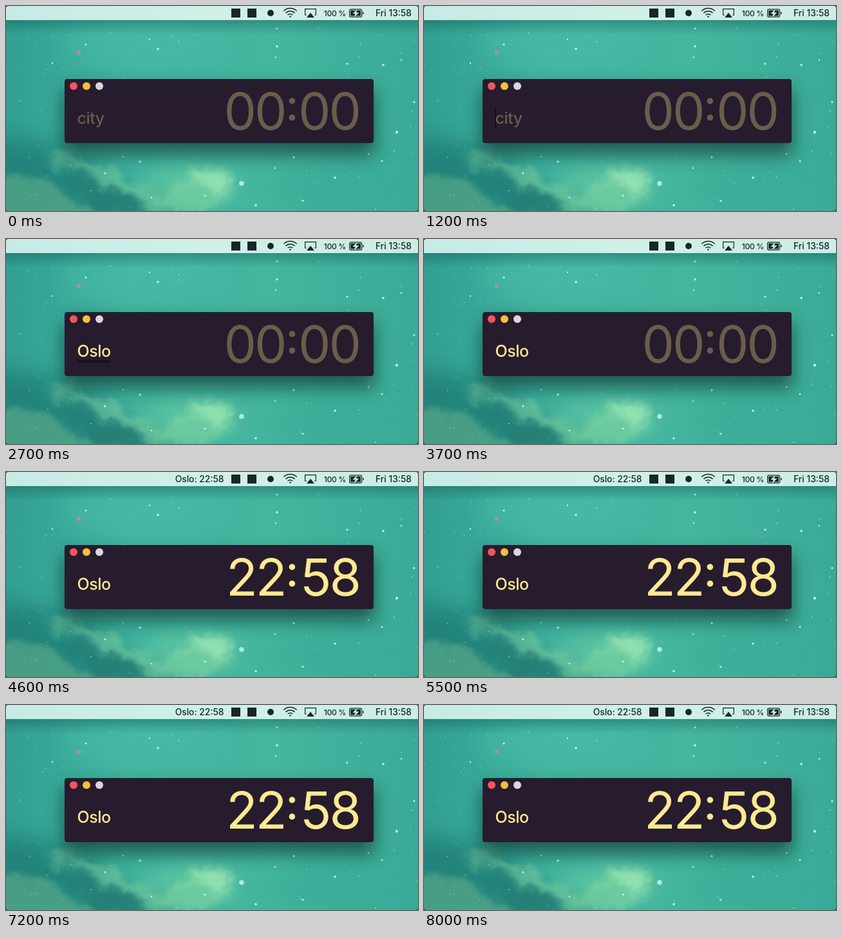
Recreate the animation shown at these times as an HTML page. Size 640 by 320 pixels, loop 8100 ms.

```html
<!DOCTYPE html>
<html lang="en">
<head>
<meta charset="utf-8">
<title>City clock</title>
<style>
  html, body { margin: 0; width: 100%; height: 100%; overflow: hidden; background: #123f40; }
  svg { display: block; width: 640px; height: 320px; }
  text { font-family: Inter, Roboto, sans-serif; white-space: pre; }
  .menu { font-size: 13.8px; font-weight: 500; fill: #172727; text-anchor: end; }
  .city { font-size: 25px; font-weight: 500; letter-spacing: -.5px; }
  .digits { font-size: 80px; letter-spacing: -3px; text-anchor: end; font-feature-settings: "calt" 0; }
  .colon { font-size: 67px; font-weight: 500; text-anchor: middle; font-feature-settings: "calt" 0; }
</style>
</head>
<body>
<svg viewBox="0 0 640 320">
  <defs>
    <linearGradient id="sky">
      <stop offset="0" stop-color="#329f91"/>
      <stop offset=".3" stop-color="#41b4a0"/>
      <stop offset=".65" stop-color="#44b59f"/>
      <stop offset="1" stop-color="#3aaa97"/>
    </linearGradient>
    <linearGradient id="bar">
      <stop offset="0" stop-color="#c6ebe4"/>
      <stop offset=".5" stop-color="#d0f0e8"/>
      <stop offset="1" stop-color="#cbede6"/>
    </linearGradient>
    <linearGradient id="under" x2="0" y2="1">
      <stop offset="0" stop-color="#0d4a48" stop-opacity=".36"/>
      <stop offset="1" stop-color="#0d4a48" stop-opacity="0"/>
    </linearGradient>
    <clipPath id="screen"><rect width="640" height="320" rx="4"/></clipPath>
    <filter id="soft" x="-50%" y="-50%" width="200%" height="200%"><feGaussianBlur stdDeviation="16"/></filter>
    <filter id="mist" x="-20%" y="-50%" width="140%" height="200%">
      <feGaussianBlur stdDeviation="7" result="cloud"/>
      <feTurbulence type="fractalNoise" baseFrequency=".025" numOctaves="4" seed="5"/>
      <feDisplacementMap in="cloud" scale="45" xChannelSelector="R" yChannelSelector="G"/>
    </filter>
    <filter id="shade" x="-20%" y="-60%" width="140%" height="240%"><feGaussianBlur stdDeviation="14"/></filter>
  </defs>

  <g clip-path="url(#screen)">
    <rect width="640" height="320" fill="url(#sky)"/>
    <g filter="url(#soft)">
      <ellipse cx="215" cy="60" rx="130" ry="40" fill="#4bbca7" opacity=".5"/>
      <path d="M-30 205Q60 200 130 245T290 340H-30Z" fill="#237f78" opacity=".85"/>
      <ellipse cx="290" cy="280" rx="75" ry="34" fill="#5fc6a0" opacity=".75"/>
      <ellipse cx="520" cy="285" rx="110" ry="40" fill="#3aac96" opacity=".6"/>
    </g>
    <g filter="url(#mist)">
      <path d="M-20 268Q40 262 85 286T170 340H-20Z" fill="#62b08a" opacity=".6"/>
      <path d="M70 232Q140 240 185 270T250 292Q300 265 345 246Q362 275 325 306T230 318Q180 290 140 268T70 248Z" fill="#78cfa2" opacity=".65"/>
      <path d="M100 268Q150 272 185 298T225 330H150Q130 290 100 268Z" fill="#257c72" opacity=".6"/>
      <path d="M270 278Q310 250 346 252Q352 280 322 300Q325 278 270 278Z" fill="#9ce8b4" opacity=".75"/>
    </g>
    <g id="stars"></g>

    <rect y="22" width="640" height="22" fill="url(#under)"/>
    <rect width="640" height="22" fill="url(#bar)"/>
    <text class="menu" id="zone" x="338.5" y="16"></text>
    <g fill="#172727">
      <rect x="350" y="4" width="14" height="14"/>
      <rect x="375" y="4" width="14" height="14"/>
      <circle cx="411" cy="11" r="5"/>
    </g>
    <g id="wifi" fill="none" stroke="#172727" stroke-width="1.4"></g>
    <path d="M467 14H464.6V4.6H481.4V14H479" fill="none" stroke="#172727" stroke-width="1.2"/>
    <path d="M473 10.5L479 18H467Z" fill="#172727"/>
    <text class="menu" x="528" y="15.5" style="font-size:12.2px;letter-spacing:-.4px">100 %</text>
    <rect x="533.6" y="5.1" width="19" height="12" rx="2.4" fill="none" stroke="#172727" stroke-width="1.2"/>
    <rect x="535.2" y="6.7" width="15.8" height="8.8" rx="1" fill="#172727"/>
    <path d="M554.2 9Q556 9.5 556 11T554.2 13.2Z" fill="#172727"/>
    <path d="M545.5 5L538.5 12H542.5L541 17.5L548.5 10.2H544Z" fill="#cdeee6"/>
    <text class="menu" x="630" y="16">Fri 13:58</text>

    <rect x="90" y="130" width="482" height="102" rx="6" fill="#0a302d" opacity=".68" filter="url(#shade)"/>
    <rect x="91" y="114" width="480" height="100" rx="4" fill="#261c2e"/>
    <circle cx="105" cy="125" r="6" fill="#f4555b"/>
    <circle cx="125" cy="125" r="6" fill="#f9bd3f"/>
    <circle cx="145" cy="125" r="6" fill="#d8d8d8"/>
    <text class="city" id="city" x="110.5" y="184"></text>
    <rect id="mark" x="110" y="189" width="53" height="4" rx="2" fill="#19111f"/>
    <rect id="caret" y="158" width="1.3" height="32" fill="#0d0812"/>
    <g id="clock">
      <text class="digits" id="hours" x="433.5" y="193"></text>
      <text class="colon" x="444.5" y="179">:</text>
      <text class="digits" id="minutes" x="549" y="193"></text>
    </g>
  </g>
</svg>
<script>
const LOOP = 8100, FOCUS = 1000, TYPE = 1600, KEY_GAP = 150, ENTER = 4100, BLINK = 500;
const WORD = 'Oslo', BRIGHT = '#ffe991', DIM = '#6b5d4b';
const TYPED = TYPE + KEY_GAP * (WORD.length - 1);
const $ = id => document.getElementById(id);

function add(parent, tag, attrs) {
  const el = document.createElementNS('http://www.w3.org/2000/svg', tag);
  for (const key in attrs) el.setAttribute(key, attrs[key]);
  parent.appendChild(el);
}

function drawStars() {
  let seed = 17;
  const random = () => (seed = seed * 16807 % 2147483647) / 2147483647;
  const star = (cx, cy, r, fill, opacity) => add($('stars'), 'circle', { cx, cy, r, fill, opacity });
  for (let i = 0; i < 130; i++) {
    star(random() * 640, 24 + random() * 294, .4 + random() * .6, '#c9f5e6', .3 + random() * .5);
  }
  const bright = [
    [72, 89], [124, 60], [236, 67], [223, 52], [421, 35], [421, 63], [419, 80],
    [530, 90], [586, 92], [614, 84], [634, 150], [447, 236], [563, 231], [584, 242],
    [511, 268], [418, 253], [461, 304], [388, 311], [182, 235], [154, 261],
    [208, 243], [226, 299], [309, 296]
  ];
  bright.forEach(([x, y], i) => star(x, y, 1.2 + i % 3 * .3, '#d8faef', .9));
  star(607, 197, 2.2, '#b5f3ee', .95);
  star(366, 277, 3.8, '#a9f2e8', .95);
  star(113, 73, 3.4, '#b48bac', .9);
}

function drawWifi() {
  for (const r of [5.5, 10, 14.5]) {
    const d = r * Math.SQRT1_2;
    add($('wifi'), 'path', { d: `M${441.5 - d} ${18 - d}A${r} ${r} 0 0 1 ${441.5 + d} ${18 - d}` });
  }
  add($('wifi'), 'circle', { cx: 441.5, cy: 16.5, r: 1.2, fill: '#172727', stroke: 'none' });
}

function show(id, on) {
  $(id).setAttribute('visibility', on ? 'visible' : 'hidden');
}

function render(t) {
  const count = t < TYPE ? 0 : Math.min(WORD.length, Math.floor((t - TYPE) / KEY_GAP) + 1);
  const city = $('city');
  city.textContent = count ? WORD.slice(0, count) : 'city';
  city.setAttribute('fill', count ? BRIGHT : DIM);

  // Each keystroke restarts the blink.
  const last = count ? TYPE + (count - 1) * KEY_GAP : FOCUS;
  const lit = Math.floor((t - last) / BLINK) % 2 === 0;
  show('caret', t >= FOCUS && t < ENTER && lit);
  $('caret').setAttribute('x', 110.5 + (count ? city.getComputedTextLength() : 0));
  show('mark', t >= TYPED + 300 && t < 3300);

  const done = t >= ENTER;
  $('hours').textContent = done ? '22' : '00';
  $('minutes').textContent = done ? '58' : '00';
  $('clock').setAttribute('fill', done ? BRIGHT : DIM);
  $('zone').textContent = done ? 'Oslo: 22:58' : '';
}

drawStars();
drawWifi();
const start = performance.now();
function tick() {
  render((performance.now() - start) % LOOP);
  requestAnimationFrame(tick);
}
tick();
</script>
</body>
</html>
```
